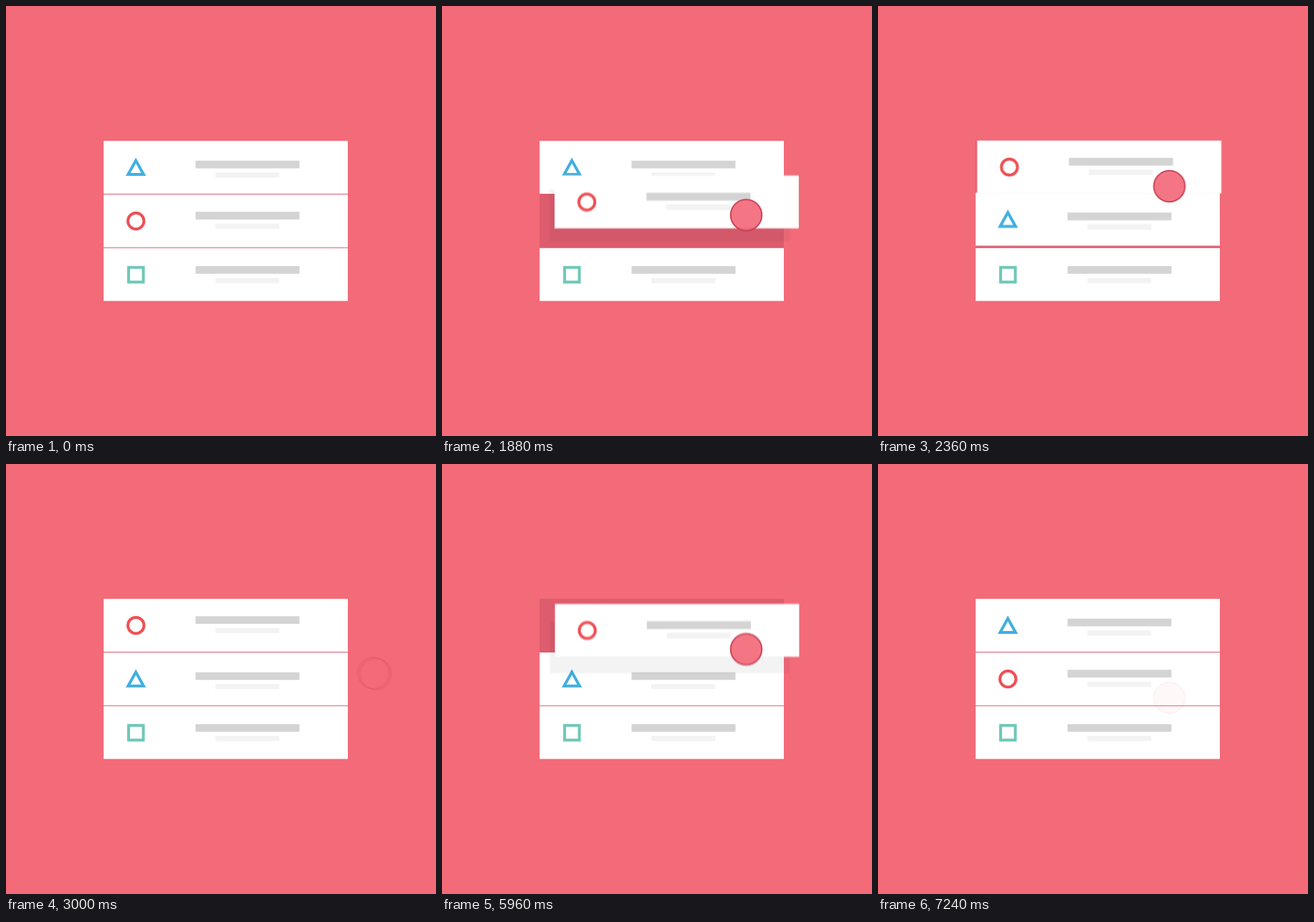
An HTML page with a canvas for the animation above (8.2 s loop, 600 by 600 pixels).

```html
<!DOCTYPE html>
<html lang="en">
<head>
<meta charset="utf-8">
<title>Reordering a list</title>
<style>
html, body { margin: 0; width: 100%; height: 100%; overflow: hidden; background: #f36a79; }
canvas { display: block; width: 600px; height: 600px; }
</style>
</head>
<body>
<canvas id="stage" width="600" height="600"></canvas>
<script>
const LOOP = 8200, FRAME = 40, SHUTTER = 20, SAMPLES = 8;
const BG = '#f36a79', SLOT = '#dd5c6e';
const LEFT = 136.2, WIDTH = 340.8, HEIGHT = 73.8;
const TOP = 188.2, MID = 263, LOW = 337.8;

const out = document.getElementById('stage').getContext('2d');
const buffer = document.createElement('canvas');
buffer.width = buffer.height = 600;
const ctx = buffer.getContext('2d');

const lin = (a, b, t) => Math.min(1, Math.max(0, (t - a) / (b - a)));
const ease = (a, b, t) => { const u = lin(a, b, t); return u * u * (3 - 2 * u); };
const mix = (a, b, u) => a + (b - a) * u;

function pose(t) {
  const first = t < 4000;
  const lift1 = ease(930, 1240, t), drop1 = ease(2200, 2400, t);
  const lift2 = ease(5480, 5840, t), drop2 = ease(6360, 6680, t);
  const lift = lift1 - drop1 + lift2 - drop2;
  const move = ease(1800, 2190, t) - ease(5840, 6270, t);
  const swap = ease(2016, 2400, t) - ease(6080, 6480, t);

  const x = LEFT + 20 * lift + 2.5 * Math.sin(Math.PI * move);
  const y = mix(MID, TOP, move) + lift * mix(-20, -4.2, move);
  const shade = lift * (first ? mix(20, 4, move) : 24);

  // away: 0 over the list, 1 parked at the right
  const away = first ? ease(2560, 3170, t) : 1 - ease(5040, 5400, t);
  const px = 404.5 + 20 * lift + 135.5 * away + 2 * drop2;
  const py = 50.5 * away + (first
    ? 314.5 - 20 * lift1 - 43 * ease(1800, 2320, t)
    : 251.5 + y - TOP);
  const alpha = first
    ? lin(760, 920, t) - lin(2800, 3080, t)
    : lin(5000, 5100, t) - 0.95 * lin(6680, 7240, t);

  return { x, y, lift, shade, px, py, alpha, triY: mix(TOP, MID, swap) };
}

function rect(color, x, y, w, h) {
  ctx.fillStyle = color;
  ctx.fillRect(x, y, w, h);
}

const icons = {
  triangle() {
    ctx.strokeStyle = '#41afdf';
    ctx.moveTo(45, 27.4);
    ctx.lineTo(55.8, 46.8);
    ctx.lineTo(34.2, 46.8);
    ctx.closePath();
  },
  circle() {
    ctx.strokeStyle = '#ef5055';
    ctx.arc(45.1, 37, 11.2, 0, 2 * Math.PI);
  },
  square() {
    ctx.strokeStyle = '#6fc8b7';
    ctx.rect(34.9, 26.9, 20.5, 20.5);
  }
};

function card(icon, x, y, barY) {
  ctx.save();
  ctx.translate(x, y);
  rect('#fff', 0, 0, WIDTH, HEIGHT);
  rect('#d4d4d4', 128.3, barY, 145, 10.7);
  rect('#f3f3f3', 156, barY + 16.4, 89.2, 7.2);
  ctx.lineWidth = 4;
  ctx.beginPath();
  icons[icon]();
  ctx.stroke();
  ctx.restore();
}

function shadow(p) {
  if (p.lift <= 0) return;
  // soft edge built from nested rectangles
  for (let i = 0; i < 4; i++) {
    const inset = 1.5 + i;
    rect(`rgba(0,0,0,${0.0135 * p.lift})`,
      p.x - 10 * p.lift + inset, p.y + p.shade + inset - 1,
      WIDTH - 2 * inset, HEIGHT - 2 * inset + 2);
  }
}

function pointer(p) {
  if (p.alpha <= 0) return;
  ctx.beginPath();
  ctx.arc(p.px, p.py, 21.8, 0, 2 * Math.PI);
  ctx.globalAlpha = p.alpha * 0.92;
  ctx.fillStyle = BG;
  ctx.fill();
  ctx.globalAlpha = p.alpha;
  ctx.strokeStyle = '#c93f55';
  ctx.lineWidth = 1.8;
  ctx.stroke();
  ctx.globalAlpha = 1;
}

function scene(p) {
  rect(BG, 0, 0, 600, 600);
  rect(SLOT, LEFT, TOP, WIDTH, LOW + HEIGHT - TOP);
  card('square', LEFT, LOW, 25.2);
  card('triangle', LEFT, p.triY, 27.6);
  shadow(p);
  card('circle', p.x, p.y, 24.2);
  pointer(p);
}

function render(t) {
  const a = pose(t - SHUTTER / 2), b = pose(t + SHUTTER / 2);
  const still = ['x', 'y', 'px', 'py', 'triY'].every(k => Math.abs(a[k] - b[k]) < 0.05);
  const n = still ? 1 : SAMPLES;
  // averaging the samples gives the motion blur
  for (let i = 0; i < n; i++) {
    scene(pose(t + SHUTTER * ((i + 0.5) / n - 0.5)));
    out.globalAlpha = 1 / (i + 1);
    out.drawImage(buffer, 0, 0);
  }
}

const start = performance.now();
let shown = -1;

function tick() {
  const now = Math.max(0, performance.now() - start) % LOOP;
  let t = Math.floor(now / FRAME) * FRAME;
  if (t > 3000 && t < 5040) t = 3000;
  if (t > 7240) t = 7240;
  if (t !== shown) {
    render(t);
    shown = t;
  }
  requestAnimationFrame(tick);
}
tick();
</script>
</body>
</html>
```
